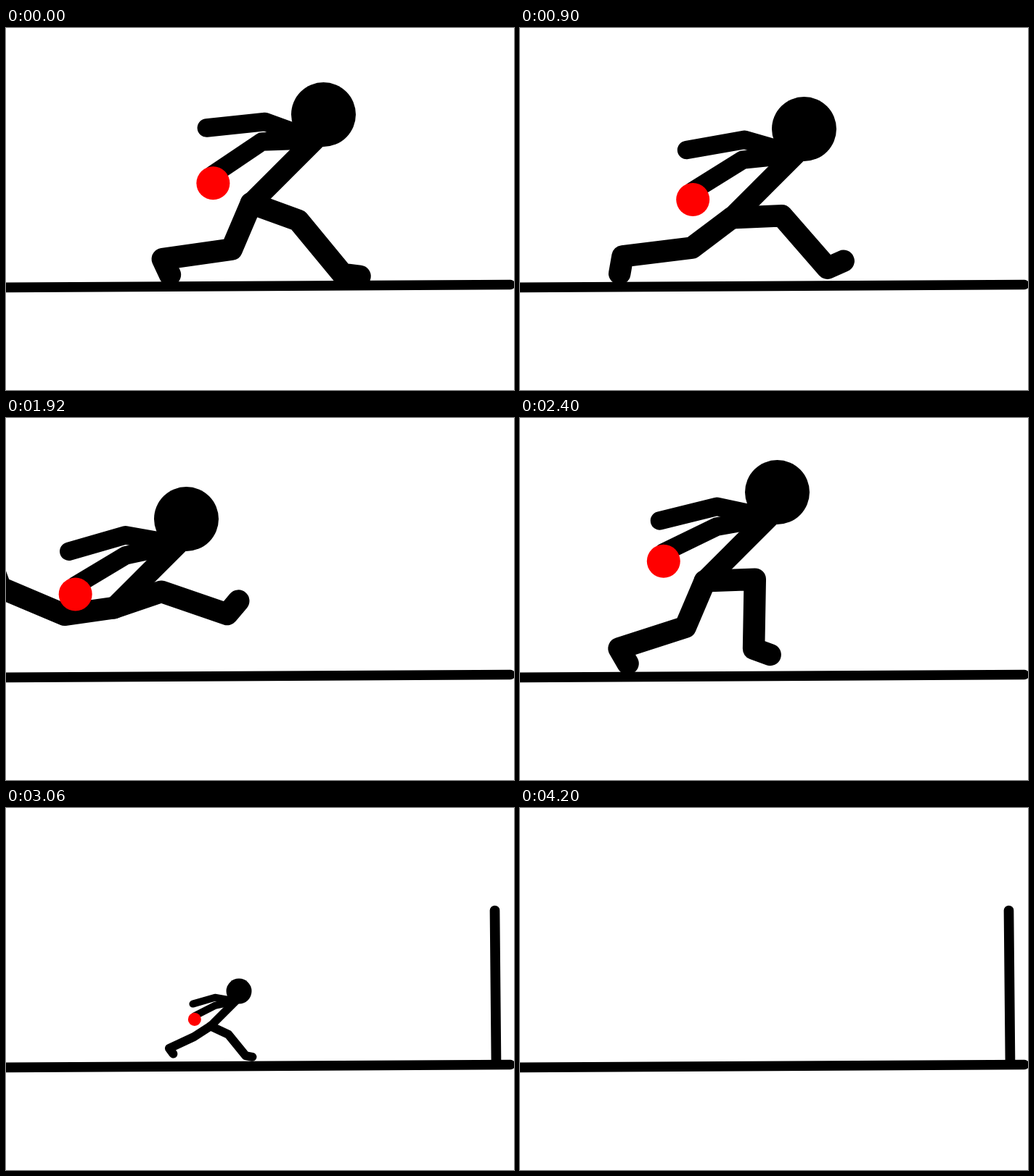
An HTML page with a canvas for the animation above (5.94 s loop, 700x500 px).

```html
<!DOCTYPE html>
<html lang="en">
<head>
<meta charset="utf-8">
<title>Runner</title>
<style>
  html, body { margin: 0; width: 100%; height: 100%; overflow: hidden; background: #fff; }
  canvas { display: block; }
</style>
</head>
<body>
<canvas id="stage" width="700" height="500"></canvas>
<script>
const ctx = document.getElementById('stage').getContext('2d');
const STEP = 60, LOOP = 5940, LAST = 70;
const SMALL = 0.393, SMALL_Y = 209.4;
const FAR = 45, JUMP = 55, KICK = 60;

// Run cycle. Angles are in degrees, clockwise from the right.
// y: head height, arm: upper arm, carry: forearm with the ball,
// front and back: thigh, shin, foot
const cycle = [
  { y: 102.5, arm: 192, carry: 154, front: [-2, 91, 20], back: [113, 162, 60] },
  { y: 139.5, arm: 196, carry: 148, front: [-2.5, 49, -24], back: [143, 173, 100] },
  { y: 139.5, arm: 190, carry: 149, front: [-19, 19, -50], back: [172, 203, 250] },
  { y: 111, arm: 190, carry: 153, front: [25, 51, 11], back: [147, 155, 54] },
  { y: 119.5, arm: 200, carry: 146, front: [20, 50.5, 7], back: [113, 172, 65] },
  { y: 140.5, arm: 185, carry: 140, front: [25.5, 33.5, -35], back: [60, 182, 142] }
];
const [push, , leap] = cycle;

// Each run across: first step, head x there, place in the cycle
const runs = [
  [0, 437.5, 4], [6, 200, 5], [13, 241.5, 5], [21, 24.5, 2],
  [31, 173.5, 1], [39, 279.5, 5], [FAR, 99, 3]
];

function line(width, pts) {
  ctx.lineWidth = width;
  ctx.beginPath();
  pts.forEach(p => ctx.lineTo(...p));
  ctx.stroke();
}

// Draws bones end to end and returns the free end
function limb(width, [x, y], lengths, angles) {
  const pts = [[x, y]];
  lengths.forEach((len, i) => {
    const a = angles[i] * Math.PI / 180;
    pts.push([x += len * Math.cos(a), y += len * Math.sin(a)]);
  });
  line(width, pts);
  return [x, y];
}

function disc(x, y, r, color) {
  ctx.fillStyle = color;
  ctx.beginPath();
  ctx.arc(x, y, r, 0, 2 * Math.PI);
  ctx.fill();
}

function figure({ y, arm, carry, front, back }, x, top, scale) {
  const neck = [-12, 35], armBones = [73, 81], legBones = [69, 96, 24];
  ctx.save();
  ctx.translate(x, top + y * scale);
  ctx.scale(scale, scale);
  const hip = limb(29, neck, [124], [135]);
  limb(25.5, neck, armBones, [arm, arm - 26]);
  const hand = limb(25.5, neck, armBones, [arm - 22, carry]);
  limb(30.5, hip, legBones, front);
  limb(30.5, hip, legBones, back);
  disc(0, 0, 44.5, '#000');
  disc(hand[0], hand[1] + 12, 23, '#f00');
  ctx.restore();
}

function runner(step) {
  const [from, x0, phase] = runs.findLast(r => r[0] <= step);
  const n = step - from, pose = cycle[(phase + n) % cycle.length];
  if (from < FAR) return figure(pose, x0 + 75 * n, 0, 1);
  // Far away: run, leap to the post, then kick off upwards
  const up = Math.max(0, step - KICK);
  const air = Math.max(0, Math.min(step, KICK) - JUMP);
  const x = x0 + 37 * (n - up) + 6 * up;
  figure(up ? push : air ? leap : pose, x, SMALL_Y - 31 * air - 22 * up, SMALL);
}

function draw(now) {
  const step = Math.min(LAST, Math.floor((now % LOOP) / STEP));
  ctx.fillStyle = '#fff';
  ctx.fillRect(0, 0, 700, 500);
  ctx.strokeStyle = '#000';
  ctx.lineCap = ctx.lineJoin = 'round';
  line(13.7, [[-10, 358.5], [695, 354.5]]);
  if (step >= FAR) line(13.7, [[673.5, 141.5], [675.5, 354]]);
  if (step < LAST) runner(step);
}

let start;
function tick(now) {
  start ??= now;
  draw(now - start);
  requestAnimationFrame(tick);
}
draw(0);
requestAnimationFrame(tick);
</script>
</body>
</html>
```
